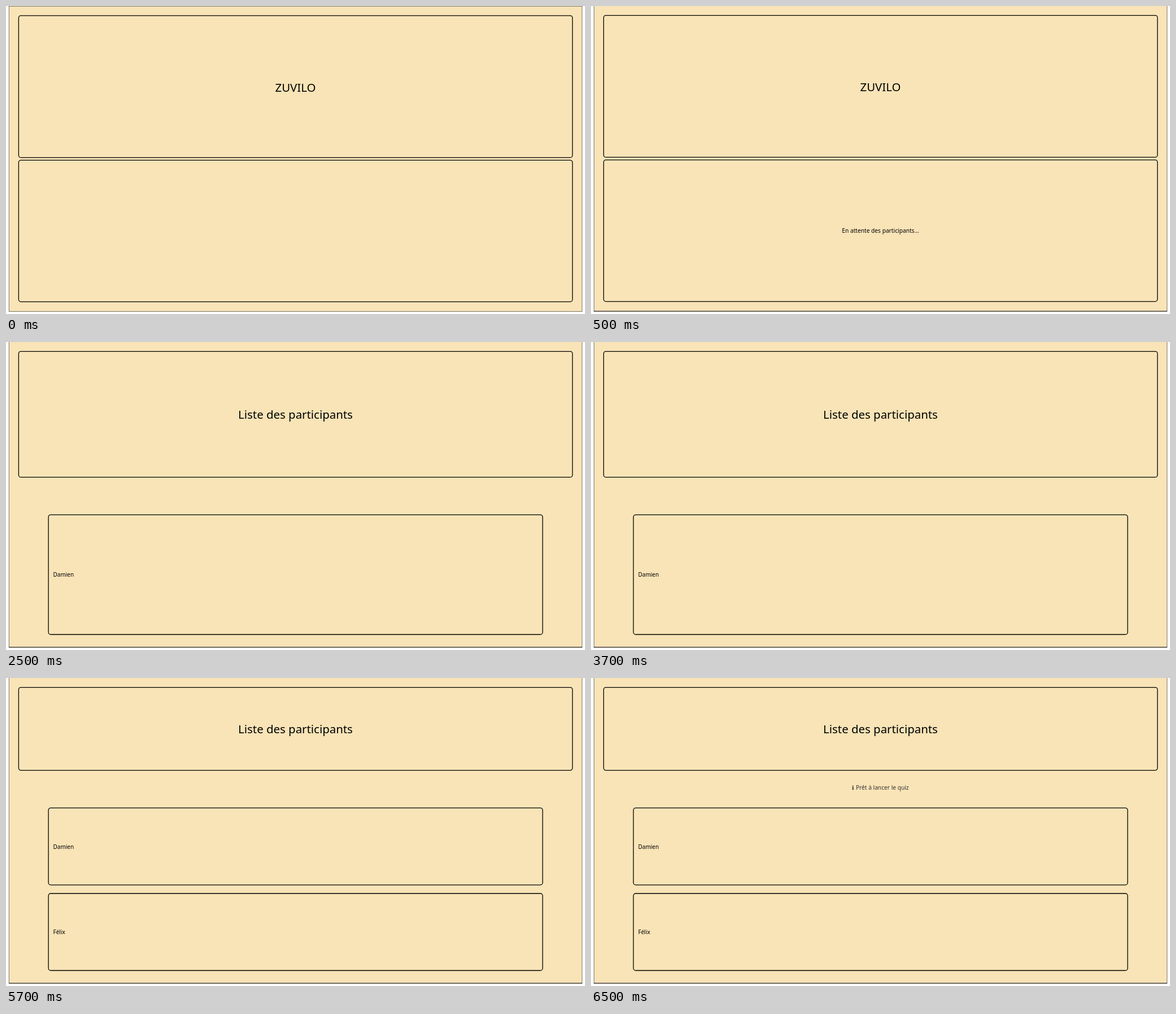
An HTML page that plays this animation: 1025x546 px, repeating every 8000 ms.

```html
<!DOCTYPE html>
<html lang="fr">
<head>
<meta charset="utf-8">
<title>Quiz</title>
<style>
html, body { margin: 0; width: 100%; height: 100%; overflow: hidden; background: #fff; }
svg { display: block; width: 1025px; height: 546px; font-family: "Noto Sans", "Open Sans", sans-serif; }
.box { fill: none; stroke: #000; stroke-width: 1.3; }
.title { font-size: 20.4px; text-anchor: middle; }
.note { font-size: 10.2px; text-anchor: middle; }
.name { font-size: 10px; }
</style>
</head>
<body>
<svg id="stage" viewBox="0 0 1025 546"></svg>
<script>
const LOOP = 8000;
const MID = 512.5;
const PLAYERS = ["Damien", "Félix"];
const stage = document.getElementById("stage");

const box = (x, top, right, bottom) =>
  `<rect class="box" x="${x}" y="${top}" width="${right - x}" height="${bottom - top}" rx="4"/>`;
const wide = (top, bottom) => box(22.4, top, 1002.8, bottom);
const text = (kind, x, y, words) => `<text class="${kind}" x="${x}" y="${y}">${words}</text>`;
const line = (d, color, width) => `<path d="${d}" fill="none" stroke="${color}" stroke-width="${width}"/>`;

function panel(early) {
  const fill = '<rect x="5" y="0" width="1015" height="541.5" fill="#f9e4b7"/>';
  const sides = line("M5.3 0V541.5M1019.8 0V541.5", "#55524b", 0.8);
  const ends = early
    ? line("M5 .4H1020M5 541.5H1020", "#55524b", 0.8)
    : line("M5 541.2H1020", "#222", 1.2);
  return fill + sides + ends;
}

function welcome(early) {
  const dy = early ? 0.5 : 0;
  return panel(early) +
    wide(16.6 + dy, 268.2 + dy) + wide(272.9 + dy, 523.8 + dy) +
    text("title", MID, 151 + dy, "ZUVILO") +
    (early ? "" : text("note", MID, 402.3, "En attente des participants..."));
}

// The header and the rows share the height left by the gaps.
function list(count, ready) {
  const headEnd = count === 1 ? 239.7 : 163.6;
  const first = headEnd + 66.7;
  const pitch = (518.5 - first + 15.2) / count;
  let out = panel(false) + wide(16.6, headEnd) +
    text("title", MID, (16.6 + headEnd) / 2 + 7.9, "Liste des participants");
  for (let i = 0; i < count; i++) {
    const top = first + i * pitch;
    const bottom = top + pitch - 15.2;
    out += box(75.1, top, 950, bottom) +
      text("name", 83.5, (top + bottom) / 2 + 4, PLAYERS[i]);
  }
  if (ready) {
    out += '<g fill="#333"><text x="461.8" y="198" font-size="10.2" font-family="DejaVu Sans, sans-serif">ℹ</text>' +
      text("note", 515.8, 198, "Prêt à lancer le quiz") + "</g>";
  }
  return out;
}

const scenes = [
  [0, () => welcome(true)],
  [500, () => welcome(false)],
  [2500, () => list(1, false)],
  [4500, () => list(2, false)],
  [6500, () => list(2, true)]
];

let shown = null;
function draw(now) {
  const t = now % LOOP;
  const scene = scenes.filter(([start]) => start <= t).pop();
  if (scene !== shown) {
    stage.innerHTML = scene[1]();
    shown = scene;
  }
}

const begin = performance.now();
function tick() {
  draw(performance.now() - begin);
  requestAnimationFrame(tick);
}
tick();
</script>
</body>
</html>
```
